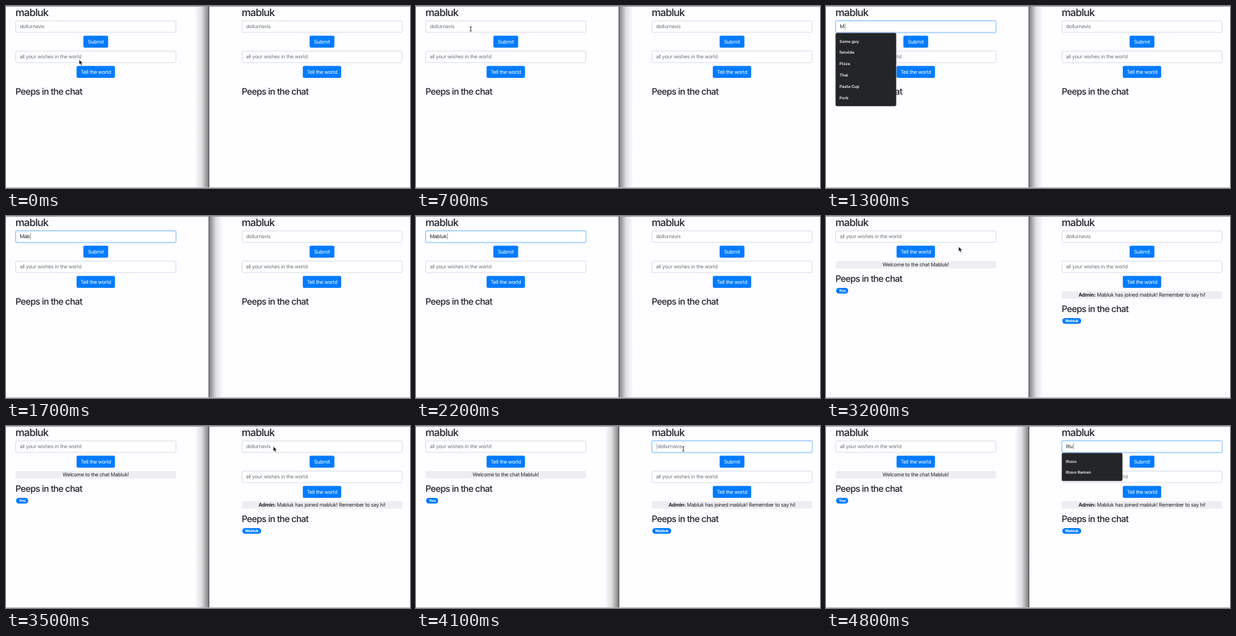
Write an HTML page that moves like this. It is 600 px wide and 271 px high and loops after 5 s.

```html
<!DOCTYPE html>
<html lang="en">
<head>
<meta charset="utf-8">
<title>Chat in two windows</title>
<style>
  html, body { margin: 0; width: 100%; height: 100%; overflow: hidden; background: #fefdff; }
  svg { display: block; width: 100%; height: 100%; }
  text { font: 400 7.6px Inter, sans-serif; letter-spacing: -.028em; fill: #212529; text-rendering: geometricPrecision; }
  .title, .heading { font-weight: 500; letter-spacing: -.046em; }
  .title { font-size: 15.2px; }
  .heading { font-size: 13.3px; }
  .hint { fill: #6c757d; }
  .white { fill: #fff; }
  .badge { font-size: 5.7px; font-weight: 700; fill: #fff; }
  .option { font-size: 6px; font-weight: 600; letter-spacing: 0; fill: #f4f4f5; }
  .mid { text-anchor: middle; }
</style>
</head>
<body>
<svg id="stage" viewBox="0 0 600 271">
  <defs>
    <linearGradient id="shade">
      <stop offset="0" stop-opacity="0"/>
      <stop offset=".5" stop-opacity=".12"/>
      <stop offset="1" stop-opacity=".5"/>
    </linearGradient>
  </defs>
  <rect width="600" height="271" fill="#fefdff"/>
  <g id="scene"></g>
</svg>
<script>
const LOOP = 5000, STEP = 100;
const APP = 'mabluk', USER = 'Mabluk', GUEST = 'Iltuvo';
const NAME_HINT = 'dollurnavis', MESSAGE_HINT = 'all your wishes in the world';
const HISTORY = ['Some guy', 'fenolda', 'Pizza', 'Thai', 'Pasta Cup', 'Pork'];
const MIDDLE = 133.3;

// Times at which each further letter of a name has been typed.
const USER_KEYS = [1200, 1500, 1700, 1900, 2000, 2100];
const GUEST_KEYS = [4500, 4600, 4700, 4800].map((t, i) => i === 1 ? 4700 : t);

// Pointer stops: time, x, y, shape shown from then on.
const POINTER = [
  [0, 108.7, 80, 'arrow'], [100, 108.7, 80, 'arrow'], [600, 81.3, 34, 'beam'],
  [1200, 81.3, 34, 'none'], [2400, 81.3, 34, 'none'], [2500, 112, 47, 'hand'],
  [2700, 127, 51, 'hand'], [3050, 127, 51, 'arrow'], [3500, 397, 30.5, 'arrow'],
  [4000, 397, 34, 'beam'], [4500, 397, 34, 'none'], [LOOP, 397, 34, 'none']
];

const SHAPES = {
  none: '',
  arrow: '<path d="M0 0v7.2l1.7-1.5 1.2 2.8 1.4-.6-1.2-2.7h2.3z" fill="#111" stroke="#fff" stroke-width=".5"/>',
  beam: '<path d="M-1.6-3.4Q0-3.4 0-2.4Q0-3.4 1.6-3.4M0-2.4V2.4M-1.6 3.4Q0 3.4 0 2.4Q0 3.4 1.6 3.4" fill="none" stroke="#222" stroke-width=".9"/>',
  hand: '<path d="M-.8.6Q0-.4.7.6V3L4 3.6Q5 4 4.7 5.4L4 8.2H.2L-2.2 5Q-2.3 3.9-.8 4.6z" fill="#fff" stroke="#111" stroke-width=".7"/>'
};

const text = (x, y, label, cls = '') => `<text x="${x}" y="${y}" class="${cls}">${label}</text>`;
const box = (x, y, w, h, r, fill, extra = '') =>
  `<rect x="${x}" y="${y}" width="${w}" height="${h}" rx="${r}" fill="${fill}" ${extra}/>`;

function field(y, hint, value, focused, caret) {
  const glow = focused ? box(13.3, y - 1, 240, 19.4, 2.8, '#bfdeff') : '';
  const border = `stroke="${focused ? '#80bdff' : '#ced4da'}" stroke-width=".8"`;
  const cursor = caret ? '<tspan font-weight="300">|</tspan>' : '';
  const label = value ? text(20.4, y + 11.4, value + cursor)
    : text(20.4, y + 11.4, cursor + hint, 'hint');
  return glow + box(14.5, y + .2, 237.8, 17, 2, '#fff', border) + label;
}

const button = (y, w, label) =>
  box(MIDDLE - w / 2, y, w, 17.8, 2, '#007bff') + text(MIDDLE, y + 11.6, label, 'white mid');

function dropdown(options) {
  if (!options.length) return '';
  return box(14.3, 40.2, 89.8, 8 + 16.8 * options.length, 2, '#232528', 'stroke="#44474b" stroke-width=".5"') +
    options.map((label, i) => text(20, 54.6 + 16.8 * i, label, 'option')).join('');
}

function pane(x, p) {
  let y = 22, out = text(14, 15, APP, 'title');
  if (!p.joined) {
    out += field(y, NAME_HINT, p.value, p.focused, p.focused) + button(y + 22.2, 36.8, 'Submit');
    y += 45;
  }
  out += field(y, MESSAGE_HINT) + button(y + 22.2, 57, 'Tell the world');
  y += 45;
  if (p.notice) {
    out += box(14.3, y, 238, 11, 0, '#eeedef') + text(MIDDLE, y + 8.3, p.notice, 'mid');
  } else {
    y -= 11.2;
  }
  out += text(14, y + 31.2, 'Peeps in the chat', 'heading');
  if (p.peep) {
    const w = p.peep === 'You' ? 18 : 28;
    out += box(15, y + 40, w, 8.4, 4.2, '#007bff') + text(15 + w / 2, y + 46.3, p.peep, 'badge mid');
  }
  return `<g transform="translate(${x})">${out}${dropdown(p.options)}</g>`;
}

function pointer(t) {
  const i = POINTER.findIndex((stop, k) => t < POINTER[k + 1][0]);
  const [t0, x0, y0, shape] = POINTER[i], [t1, x1, y1] = POINTER[i + 1];
  const u = (t - t0) / (t1 - t0), e = u * u * (3 - 2 * u);
  return `<g transform="translate(${x0 + (x1 - x0) * e} ${y0 + (y1 - y0) * e})">${SHAPES[shape]}</g>`;
}

function frame(leftActive) {
  const shadow = box(280, 1, 21, 269, 0, 'url(#shade)', leftActive ? 'transform="matrix(-1 0 0 1 602.5 0)"' : '');
  return shadow + box(300.8, 0, 1.1, 271, 0, '#4b4b4e') +
    box(0, 0, 600, .8, 0, '#77777a') + box(0, 270, 600, 1, 0, '#b5b5b8');
}

function scene(t) {
  const typed = (name, keys) => name.slice(0, keys.filter(k => t >= k).length);
  const joined = t >= 2700, announced = t >= 3200;
  const left = {
    joined,
    value: typed(USER, USER_KEYS),
    focused: t >= 800,
    options: t >= 1200 && t < 1500 ? HISTORY : [],
    notice: joined && `Welcome to the chat ${USER}!`,
    peep: joined && 'You'
  };
  const right = {
    value: typed(GUEST, GUEST_KEYS),
    focused: t >= 4000,
    options: t >= 4700 ? [GUEST, GUEST + ' Ramen'] : [],
    notice: announced && `<tspan font-weight="700">Admin:</tspan> ${USER} has joined ${APP}! Remember to say hi!`,
    peep: announced && USER
  };
  return frame(t >= 400 && t < 3400) + pane(0, left) + pane(336, right) + pointer(t);
}

const target = document.getElementById('scene');
let shown = -1;
function draw() {
  const t = Math.floor(performance.now() % LOOP / STEP) * STEP;
  if (t !== shown) target.innerHTML = scene(shown = t);
  requestAnimationFrame(draw);
}
draw();
</script>
</body>
</html>
```
